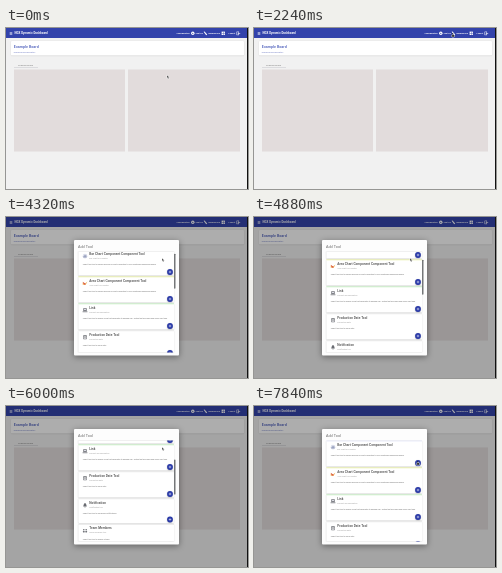
An HTML page with a canvas that plays this animation: 242 by 161 pixels, repeating every 8 s.

```html
<!DOCTYPE html>
<html lang="en">
<head>
<meta charset="utf-8">
<title>Dynamic dashboard</title>
<style>
html, body { margin: 0; width: 100%; height: 100%; overflow: hidden; background: #f1f1f1; }
canvas { display: block; width: 242px; height: 161px; }
</style>
</head>
<body>
<canvas id="stage"></canvas>
<script>
const W = 242, H = 161, LOOP = 8000, STEP = 80;
const BLUE = '#3343ab';
const canvas = document.getElementById('stage');
const ctx = canvas.getContext('2d');
const dpr = window.devicePixelRatio || 1;
canvas.width = W * dpr;
canvas.height = H * dpr;

// Keyframes: [time, value, ...]
const cursorKeys = [[0, 161, 47], [480, 168, 39], [1200, 195, 10], [1840, 198, 5],
  [3680, 198, 5], [4080, 156, 41], [7280, 156, 41], [7600, 160, 50], [7840, 163, 55], [8000, 163, 55]];
const scrollKeys = [[0, 0], [4240, 0], [4560, 8], [4880, 19], [5120, 23], [5600, 38],
  [6000, 50], [6160, 51], [6240, 51], [6640, 20], [6800, 19], [7120, 0], [8000, 0]];

// Title, subtitle, note, strip colour, icon, height
const cards = [
  ['Bar Chart Component Component Tool', 'Bar chart tool created',
    'Select this tool to embed and add a Charts collection to be a positioned dashboard board.', '#c9cdf0', 'bars', 26],
  ['Area Chart Component Component Tool', 'Area chart tool created',
    'Select this tool to embed and add a Charts collection to be a positioned dashboard board.', '#dfe88c', 'area', 26],
  ['Link', 'Product link description',
    'Select this tool to display a link that generates to desired URL. Within the tab below and show over time.', '#b4e8b0', 'link', 26],
  ['Production Date Tool', 'Production date', 'Select this tool to add a date.', '#e4e4e4', 'date', 26],
  ['Notification', 'Notification tool', 'Select this tool to add group notifications.', '#e4e4e4', 'bell', 24.5],
  ['Team Members', 'Team members tool', 'Select this tool to display a team.', '#e4e4e4', 'team', 24.5],
  ['Task List', 'Task list tool', 'Select this tool to add a list.', '#e4e4e4', 'date', 24.5]
];

function sample(keys, t) {
  let i = 1;
  while (i < keys.length - 1 && t > keys[i][0]) i++;
  const a = keys[i - 1], b = keys[i];
  const p = Math.min(1, Math.max(0, (t - a[0]) / (b[0] - a[0])));
  return a.slice(1).map((v, k) => v + (b[k + 1] - v) * p);
}

function rect(x, y, w, h, color) {
  ctx.fillStyle = color;
  ctx.fillRect(x, y, w, h);
}

function box(x, y, w, h, r, color) {
  ctx.fillStyle = color;
  ctx.beginPath();
  ctx.roundRect(x, y, w, h, r);
  ctx.fill();
}

function disc(x, y, r, color) {
  ctx.fillStyle = color;
  ctx.beginPath();
  ctx.arc(x, y, r, 0, Math.PI * 2);
  ctx.fill();
}

function path(points, color) {
  ctx.fillStyle = color;
  ctx.beginPath();
  points.forEach(([x, y]) => ctx.lineTo(x, y));
  ctx.closePath();
  ctx.fill();
}

// Small type is set large and scaled down so its size stays exact.
function text(str, x, y, size, color, weight = 400) {
  ctx.save();
  ctx.translate(x, y);
  ctx.scale(0.1, 0.1);
  ctx.font = `${weight} ${size * 10}px Roboto, sans-serif`;
  ctx.fillStyle = color;
  ctx.fillText(str, 0, 0);
  ctx.restore();
}

function shadow(color, blur, dy) {
  ctx.shadowColor = color;
  ctx.shadowBlur = blur * dpr;
  ctx.shadowOffsetY = dy * dpr;
}

function shadowBox(x, y, w, h, r, color, blur, tint) {
  ctx.save();
  shadow(tint, blur, blur / 4);
  box(x, y, w, h, r, color);
  ctx.restore();
}

function drawHeader() {
  rect(0, 0, W, 10, BLUE);
  for (let i = 0; i < 3; i++) rect(3.7, 4.1 + i, 2.6, 0.5, '#fff');
  text('NGX Dynamic Dashboard', 8.5, 6.3, 2.95, '#fff', 700);
  text('Configuration', 170.5, 6.1, 2.15, '#fff', 700);
  text('Add tool', 189.5, 6.1, 2, '#fff', 700);
  text('Background', 202.5, 6.1, 2.1, '#fff', 700);
  text('Logout', 222.5, 6.1, 2.1, '#fff', 700);

  disc(186.8, 5.3, 1.7, '#fff');
  disc(186.8, 5.3, 0.6, BLUE);
  path([[197.6, 3.8], [198.6, 3.4], [201.2, 6.4], [200.2, 7.2]], '#fff');
  rect(215.6, 3.6, 3.3, 3.4, '#fff');
  rect(217.1, 3.6, 0.4, 3.4, BLUE);
  rect(215.6, 5.1, 3.3, 0.4, BLUE);
  ctx.strokeStyle = '#fff';
  ctx.lineWidth = 0.5;
  ctx.strokeRect(230.8, 3.9, 2, 3);
  rect(231.8, 5.1, 2.4, 0.6, '#fff');
}

function drawPage() {
  rect(0, 0, W, H, '#f1f1f1');
  drawHeader();
  shadowBox(5, 13, 233, 14.5, 0.7, '#fff', 1.2, 'rgba(0,0,0,.18)');
  text('Example Board', 7.8, 20.3, 3.7, '#4658b8', 500);
  text('Example board description', 7.8, 24.5, 1.8, '#6573bf');
  text('Example Board', 12.3, 37.5, 2.2, '#777');
  rect(8, 39.5, 24, 0.5, '#c4c4ca');
  rect(8, 41.5, 111, 82, '#e2dcdc');
  rect(122, 41.5, 112, 82, '#e2dcdc');
}

function drawIcon(kind, x, y) {
  const ink = '#6a6c72';
  if (kind === 'bars') {
    disc(x, y, 2.4, '#dcdfec');
    [1.4, 2.6, 2].forEach((h, i) => rect(x - 1.4 + i, y + 1.3 - h, 0.7, h, '#6f7aa0'));
  } else if (kind === 'area') {
    path([[x - 2.3, y + 1.5], [x - 2.3, y - 1], [x, y + 0.4], [x + 2.3, y - 1.8], [x + 0.8, y + 1.5]], '#f0b45a');
    path([[x - 2.3, y - 1.4], [x - 0.2, y], [x + 0.6, y + 1.6], [x - 1, y + 1.2]], '#d8524a');
  } else if (kind === 'link') {
    box(x - 1.8, y - 2, 3.6, 2.8, 0.4, ink);
    rect(x - 1.2, y - 1.3, 2.4, 1.3, '#dcdde4');
    rect(x - 2.4, y + 1.2, 4.8, 0.8, ink);
  } else if (kind === 'date') {
    box(x - 1.8, y - 2, 3.6, 4, 0.4, ink);
    rect(x - 1.3, y - 0.8, 2.6, 2.3, '#f0f0f2');
    rect(x - 0.8, y, 1.6, 0.5, ink);
  } else if (kind === 'bell') {
    path([[x - 1.8, y + 1.2], [x - 1, y - 1.4], [x, y - 2.1], [x + 1, y - 1.4], [x + 1.8, y + 1.2]], ink);
    disc(x, y + 1.7, 0.5, ink);
  } else {
    [-1.2, 1.2].forEach(dx => {
      disc(x + dx, y - 0.9, 0.8, ink);
      box(x + dx - 1, y + 0.3, 2, 1.5, 0.7, ink);
    });
  }
}

function drawCard([title, sub, note, strip, icon, h], y) {
  shadowBox(72.3, y, 95.7, h, 0.7, '#fff', 1.3, 'rgba(0,0,0,.22)');
  rect(72.3, y, 95.7, 0.7, strip);
  drawIcon(icon, 79, y + 6.7);
  text(title, 83.3, y + 5.4, 3.2, '#444', 500);
  text(sub, 83.3, y + 9, 1.9, '#999');
  text(note, 76.8, y + 15.8, 1.85, '#666');

  const mid = y + h - 3.5;
  ctx.save();
  shadow('rgba(0,0,0,.3)', 1.2, 0.4);
  disc(164, mid, 2.9, '#2939a8');
  ctx.restore();
  rect(162.7, mid - 0.25, 2.6, 0.5, '#fff');
  rect(163.75, mid - 1.3, 0.5, 2.6, '#fff');
}

function drawDialog(t) {
  const [scroll] = sample(scrollKeys, t);
  shadowBox(68, 23, 105, 115.5, 1, '#fdfdfd', 6, 'rgba(0,0,0,.4)');
  text('Add Tool', 72, 30.8, 3.8, '#666');

  ctx.save();
  ctx.beginPath();
  ctx.rect(70.5, 34.5, 100, 101);
  ctx.clip();
  let y = 34.5 - scroll;
  for (const card of cards) {
    if (y > 5 && y < 137) drawCard(card, y);
    y += card[5] + 1;
  }
  ctx.restore();

  const bar = t < 4320 ? 0 : 1 - Math.min(1, Math.max(0, (t - 7120) / 240));
  ctx.save();
  ctx.globalAlpha *= bar;
  box(168.2, 36 + scroll * 0.35, 1.2, 35, 0.6, '#55585a');
  ctx.restore();
}

function drawCursor(t) {
  const [x, y] = sample(cursorKeys, t);
  const hand = t > 7760 || (t > 1760 && t < 3680);
  ctx.save();
  ctx.translate(x, y);
  ctx.lineWidth = 0.5;
  ctx.strokeStyle = '#fff';
  ctx.lineJoin = 'round';
  if (hand) {
    box(0.3, 0, 0.9, 2.6, 0.4, '#222');
    box(-0.3, 1.7, 2.8, 2.4, 0.7, '#222');
    ctx.stroke();
  } else {
    path([[0, 0], [0, 3.4], [0.8, 2.7], [1.4, 3.9], [2, 3.6], [1.5, 2.5], [2.5, 2.4]], '#222');
    ctx.stroke();
  }
  ctx.restore();
}

function draw(t) {
  ctx.setTransform(dpr, 0, 0, dpr, 0, 0);
  drawPage();
  const open = Math.min(1, Math.max(0, (t - 2400) / 240));
  if (open > 0) {
    const ease = 1 - (1 - open) ** 3;
    rect(0, 0, W, H, `rgba(0,0,0,${0.32 * open})`);
    ctx.save();
    ctx.globalAlpha = ease;
    ctx.translate(121, 81);
    ctx.scale(0.7 + 0.3 * ease, 0.7 + 0.3 * ease);
    ctx.translate(-121, -81);
    drawDialog(t);
    ctx.restore();
  }
  rect(W - 1, 0, 1, H, '#111');
  drawCursor(t);
}

const start = performance.now();
function tick() {
  const t = (performance.now() - start) % LOOP;
  draw(Math.floor(t / STEP) * STEP);
  requestAnimationFrame(tick);
}
tick();
</script>
</body>
</html>
```
